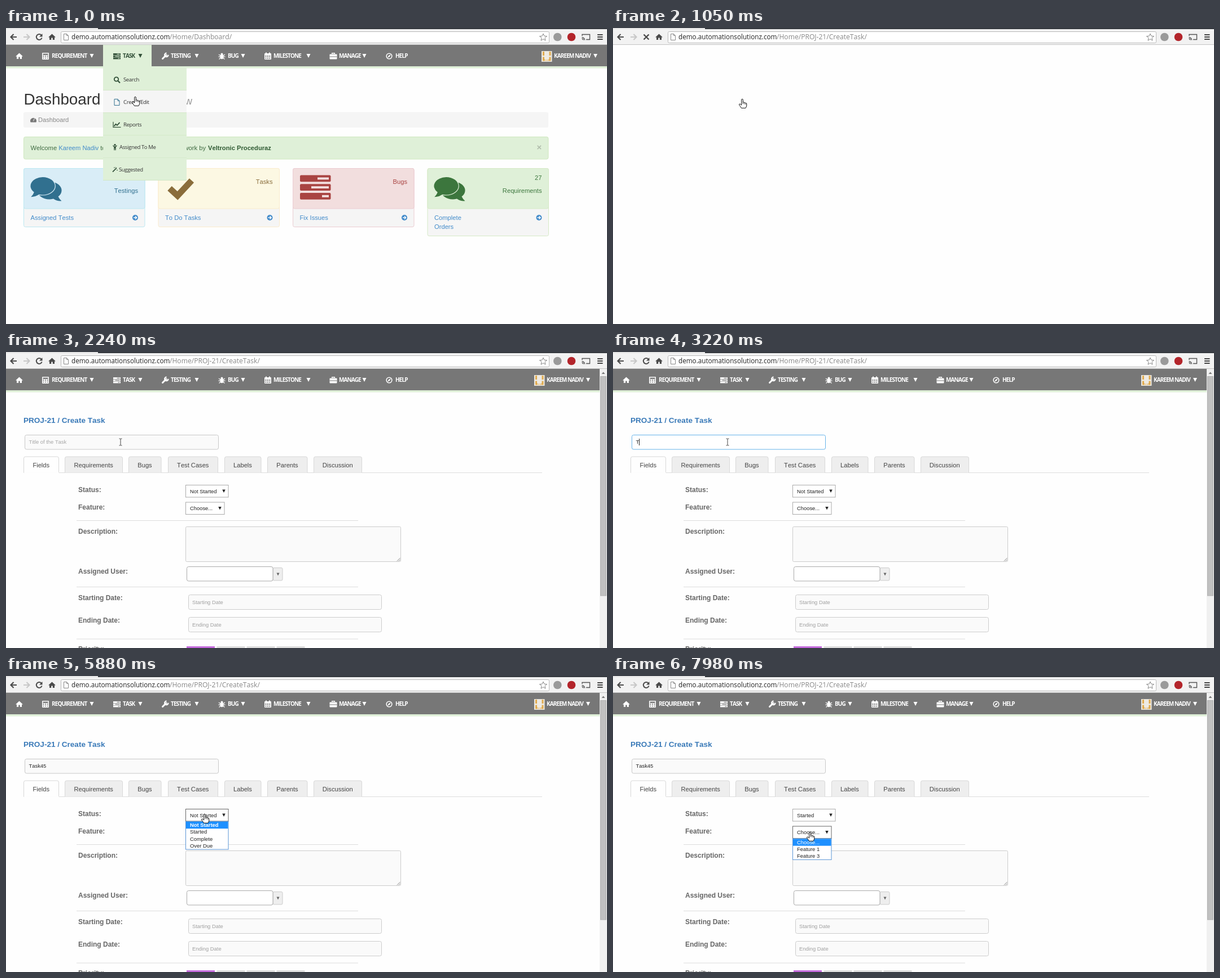
Write an HTML page that moves like this. It is 1065 by 526 pixels and loops after 8000 ms.

```html
<!DOCTYPE html>
<html lang="en">
<head>
<meta charset="utf-8">
<title>Creating a task</title>
<style>
  html, body { margin: 0; width: 100%; height: 100%; overflow: hidden; background: #fefefe; }
  svg { display: block; width: 1065px; height: 526px; font-family: "Liberation Sans", Arial, sans-serif; font-kerning: none; white-space: pre; }
  .ui { font-family: "Open Sans", "Noto Sans", sans-serif; }
  .nav { font-weight: 700; letter-spacing: -.9px; }
  .menu { letter-spacing: -.4px; }
</style>
</head>
<body>
<svg id="stage" viewBox="0 0 1065 526"></svg>
<script>
const LOOP = 8000, STEP = 70;
const USER = 'Kareem Nadiv', COMPANY = 'Veltronic Proceduraz';
const LINK = '#428bca', MINT = '#dff0d8', LEAF = '#34523a';

const text = (s, x, y, size, fill, attrs = '') =>
  `<text x="${x}" y="${y}" font-size="${size}" fill="${fill}" ${attrs}>${s}</text>`;
const rect = (x, y, w, h, fill, stroke = 'none', r = 0) =>
  `<rect x="${x}" y="${y}" width="${w}" height="${h}" fill="${fill}" stroke="${stroke}" rx="${r}"/>`;
const circle = (x, y, r, fill, attrs = '') => `<circle cx="${x}" cy="${y}" r="${r}" fill="${fill}" ${attrs}/>`;
const shape = (d, fill, attrs = '') => `<path d="${d}" fill="${fill}" ${attrs}/>`;
const line = (d, stroke, width = 1, attrs = '') =>
  `<path d="${d}" fill="none" stroke="${stroke}" stroke-width="${width}" ${attrs}/>`;
const group = (x, y, body, attrs = '') => `<g transform="translate(${x} ${y})" ${attrs}>${body}</g>`;
const down = (x, y, w, fill) => shape(`M${x - w / 2} ${y - w / 2}h${w}l${-w / 2} ${w}z`, fill);
const END = 'text-anchor="end"', MID = 'text-anchor="middle"', BOLD = 'font-weight="bold"';

// Small icons, about 12 px, centred on 0,0
const icons = {
  home: c => shape('M-6.5 .5L0-5.5 6.5.5H4.5V5H1.3V1.5H-1.3V5H-4.5V.5z', c),
  calc: (c, bg) => rect(-6, -6, 12, 12, c, 'none', 1) + rect(-4.5, -4.5, 9, 2.5, bg) +
    line('M-4.5 0h9M-4.5 3.4h9', bg, 1.8, 'stroke-dasharray="1.8 1.8"'),
  tasks: (c, bg) => [-5, -1.3, 2.4].map((y, i) =>
    rect(-6.5, y, 13, 3, c) + rect([0, -3, 2][i], y + 1, [5, 8, 3][i], 1, bg)).join(''),
  wrench: c => line('M-4.5 4.5L2-2', c, 3, 'stroke-linecap="round"') + line('M2.5-5.3A3.2 3.2 0 1 0 5.5-2.2', c, 2.2),
  bug: c => `<ellipse cy="1" rx="3" ry="4.3" fill="${c}"/>` + circle(0, -3.6, 2, c) +
    line('M-5.5-3L-2-.5M5.5-3L2-.5M-6 1.2H6M-5 5.5L-2 3M5 5.5L2 3', c, 1.2),
  calendar: (c, bg) => rect(-6, -5, 12, 11, c, 'none', 1) + line('M-4.5 0h9M-4.5 3.4h9', bg, 2, 'stroke-dasharray="2 1.4"') +
    line('M-3-6.5v3M3-6.5v3', c, 2),
  briefcase: (c, bg) => rect(-6.5, -3.5, 13, 9, c, 'none', 1) + line('M-2.3-4v-1.3h4.6V-4', c, 1.4) + line('M-6.5 1h13', bg, 1),
  compass: c => circle(0, 0, 4.8, 'none', `stroke="${c}" stroke-width="1.6"`) + shape('M3-3L1 1-3 3-1-1z', c),
  search: c => circle(-1, -1, 3.7, 'none', `stroke="${c}" stroke-width="1.8"`) + line('M2 2L5.5 5.5', c, 2.2),
  file: c => line('M-4.5-5.5H1.5L4.5-2.5V5.5H-4.5zM1.5-5.5V-2.5H4.5', c),
  chart: c => line('M-6.5-5V4.5H7', c, 1.2) + line('M-5 2.5L-2-1 .5 1 5-4', c, 1.8),
  child: c => circle(0, -4, 1.7, c) + line('M-3.5-3L-1-.5H1L3.5-3', c, 1.4) + shape('M-1.7-1h3.4v6.5H.4V2.5H-.4V5.5H-1.7z', c),
  wand: c => line('M-4 4L3-3', c, 1.8) + line('M-2-3.5h2M3 1h2M1-4.5l1 1', c),
};
const icon = (name, x, y, color, bg) => group(x, y, icons[name](color, bg));

const cursors = {
  hand: shape('M-1.3 1Q0-1 1.3 1V6Q3 5 3.8 6.6 5.4 5.8 6 7.4 7.6 7 7.8 8.8V12Q7.4 14 6 16.3H-1.5Q-3.5 13-5.3 10.8-6 8.6-3.8 9L-1.3 11z',
    '#fff', 'stroke="#111" stroke-linejoin="round"') + line('M1.3 6v3M3.8 7v2.5M6 8v2', '#111', .8),
  arrow: shape('M0 0V13.2L3 10.4 5.4 16 7.6 15 5.3 9.6H9.3z', '#fff', 'stroke="#111"'),
  ibeam: line('M-2.5-6H-.5L0-5.5.5-6H2.5M0-5.5V5.5M-2.5 6H-.5L0 5.5.5 6H2.5', '#444'),
};
const cursorPath = [
  [0, 'hand', 229, 122], [140, 'hand', 229, 126], [1820, 'hand', 229, 126],
  [1890, 'arrow', 208, 171], [1960, 'arrow', 208, 171], [2100, 'ibeam', 206, 168],
  [2240, 'ibeam', 203, 160], [4620, 'ibeam', 203, 160], [4760, 'arrow', 240, 185],
  [4970, 'arrow', 312, 238], [5110, 'hand', 352, 258], [5180, 'hand', 352, 258],
  [5390, 'hand', 352, 245], [6020, 'hand', 352, 245], [6160, 'arrow', 354, 258],
  [6440, 'arrow', 354, 270], [7140, 'arrow', 354, 271], [7210, 'hand', 352, 273],
  [7420, 'hand', 349, 276], [7910, 'hand', 349, 276], [7980, 'hand', 349, 277], [LOOP, 'hand', 349, 277],
];

function cursor(t) {
  const i = cursorPath.findLastIndex(k => k[0] <= t);
  const [t0, kind, x, y] = cursorPath[i], [t1, nextKind, nx, ny] = cursorPath[i + 1];
  const f = kind === nextKind ? (t - t0) / (t1 - t0) : 0;
  return group(x + (nx - x) * f, y + (ny - y) * f, cursors[kind]);
}

function browser(t) {
  const loading = t >= 560 && t < 1610;
  const path = t < 700 ? '/Home/Dashboard/' : '/Home/PROJ-21/CreateTask/';
  const dark = '#4a4a4a';
  return rect(0, 0, 1065, 30, '#f2f2f2') + rect(0, 0, 1065, 2, '#33373d') + rect(0, 0, 163, 2, '#e4e4e4') +
    rect(0, 29, 1065, 1, '#c4c4c4') +
    line('M19 16H9M13.5 11L8.5 16l5 5', dark, 2.2) + line('M31 16H41M36.5 11l5 5-5 5', '#c8c8c8', 2.2) +
    (loading ? line('M54.5 11.5l9 9M63.5 11.5l-9 9', dark, 2.4)
      : line('M62.5 12.5A5 5 0 1 0 63.6 17.5', dark, 2) + shape('M64.5 10v5.5H59z', dark)) +
    icon('home', 81.5, 16, dark) +
    rect(97.5, 6.5, 865, 20, '#fff', '#b9b9b9', 2) +
    line('M102.5 10.5H107.5L110.5 13.5V21.5H102.5zM107.5 10.5V13.5H110.5', '#888') +
    `<g class="ui">${text('demo.automationsolutionz.com', 116, 20, 11.7, '#222')}${text(path, 290, 20, 12.1, '#888')}</g>` +
    line('M952 10l1.8 4.2 4.7.4-3.6 3 1.1 4.6-4-2.5-4 2.5 1.1-4.6-3.6-3 4.7-.4z', '#888') +
    circle(977.3, 16, 7.3, '#9a9a9a') + circle(1002, 16, 7.3, '#b3252b') +
    line('M1021 14V11.5H1034.5V20.5H1028M1020.5 16.5a5 5 0 0 1 5 5M1020.5 19a2.5 2.5 0 0 1 2.5 2.5', '#555', 1.4) +
    line('M1048 12h9.5M1048 16h9.5M1048 20h9.5', '#444', 2.2);
}

const navItems = [
  ['calc', 70, 'REQUIREMENT', 81, 152], ['tasks', 196.5, 'TASK', 207, 238], ['wrench', 282, 'TESTING', 292, 338],
  ['bug', 382.5, 'BUG', 393, 420], ['calendar', 464, 'MILESTONE', 474, 536], ['briefcase', 580, 'MANAGE', 590, 635],
  ['compass', 679, 'HELP', 690, 0],
];

function navbar(width, taskOpen, avatar, sag) {
  const bg = '#777', userX = width - 1052, size = 10;
  const items = navItems.map(([name, ix, label, x, arrow]) => {
    const open = taskOpen && label === 'TASK', color = open ? LEAF : '#fff';
    return (open ? rect(172, 30, 86, 41, MINT) : '') + icon(name, ix, 50, color, open ? MINT : bg) +
      text(label, x, 53.2, size, color) + (arrow ? down(arrow, 49.5, 7, color) : '');
  }).join('');
  const picture = avatar
    ? rect(936, 41, 18.5, 19, '#eeeae2') + line('M939.5 42v7M939.5 51.5v5.5h2.5M951 42v7M951 51.5v5.5h-2.5M943.5 57.5h1M946.5 57.5h1', '#e0ab50', 3)
    : circle(937.5, 53, 1.5, 'none', 'stroke="#ccc"');
  return rect(0, 30, width, 38 + sag, bg) + rect(0, 68 + sag, width, 3.5, MINT) +
    `<g class="ui nav">${icon('home', 23.5, 50, '#fff')}${items}` +
    group(userX, 0, picture + text(USER.toUpperCase(), 958, 53.2, size, '#fff') + down(1031.5, 49.5, 7, '#fff')) + '</g>';
}

const bubbles = (x, y, c, bg) => group(x, y,
  shape('M33.4 8A21.6 15.7 0 0 1 49 34.600Q51 39 55 42.300 47 43 40.500 38.500 36 39.400 33.400 39.400A21.6 15.7 0 0 1 33.400 8z', c) +
  shape('M21.600 0A21.6 15.7 0 0 1 21.600 31.400Q18 31.400 15 30.800 9 35 .7 35.300 4.500 32 6.300 26.800A21.6 15.7 0 0 1 21.600 0z', c,
    `stroke="${bg}" stroke-width="2.4" paint-order="stroke"`));
const bigCheck = (x, y, c) => line(`M${x + 4} ${y + 18}l14 13L${x + 43} ${y + 4}`, c, 11);
const bigBars = (x, y, c, bg) => [31, 20, 39].map((notch, i) => {
  const top = y + 15.7 * i;
  return rect(x, top, 54.5, 11.8, c, 'none', 2) + rect(x + notch, top + 4, 51 - notch, 3.9, bg);
}).join('');

// x, background, border, ink, label lines, links, picture
const cards = [
  [31.5, '#d9edf7', '#bce8f1', '#31708f', ['', 'Testings'], ['Assigned Tests'], (c, bg) => bubbles(43.5, 265, c, bg)],
  [270, '#fcf8e3', '#faebcc', '#8a6d3b', ['Tasks'], ['To Do Tasks'], c => bigCheck(286, 267, c)],
  [508.5, '#f2dede', '#ebccd1', '#a94442', ['Bugs'], ['Fix Issues'], (c, bg) => bigBars(521, 261.5, c, bg)],
  [747, MINT, '#d6e9c6', '#3c763d', ['27', 'Requirements'], ['Complete', 'Orders'], (c, bg) => bubbles(758.5, 265, c, bg)],
];

function card([x, bg, border, ink, label, links, picture]) {
  const h = 88 + links.length * 16;
  const labelTop = label.length > 1 ? 269.5 : 277;
  return rect(x, 249.5, 214.5, h, '#f5f5f5', border, 3) + rect(x, 249.5, 214.5, 71.5, bg, border, 3) + picture(ink, bg) +
    label.map((s, i) => text(s, x + 202.5, labelTop + 23.5 * i, 11.2, ink, END)).join('') +
    links.map((s, i) => text(s, x + 12, 341 + 15.5 * i, 11.2, LINK)).join('') +
    circle(x + 197.5, 337, 5, LINK) + line(`M${x + 194.5} 337h5.5M${x + 197.5} 334.3l2.7 2.7-2.7 2.7`, '#fff', 1.3);
}

const menu = [['search', 'Search', 208, 196.5], ['file', 'Create/Edit', 208, 196.5], ['chart', 'Reports', 208, 196.5],
  ['child', 'Assigned To Me', 201, 193], ['wand', 'Suggested', 200, 193]];

function dashboard() {
  const dropdown = menu.map(([name, label, x, ix], i) => {
    const y = 71 + 39.9 * i;
    return rect(172, y, 148, 39.9, i === 1 ? '#f5f5f5' : MINT) + rect(172, Math.round(y + 39), 148, 1, '#d0e6c4') +
      icon(name, ix, y + 21, i === 1 ? '#31708f' : LEAF, MINT) + text(label, x, y + 24, 9.6, '#333');
  }).join('');
  return text('Dashboard', 31.5, 135.5, 27.8, '#333') + text('Statistics Overview', 330, 135.5, 18, '#999', END) +
    rect(31, 149.5, 930, 27.5, '#f5f5f5', 'none', 3) +
    shape('M43.5 167.5A5.5 5.5 0 1 1 53.5 167.5z', '#777') + line('M48.5 165.5L50.5 160.5', '#f5f5f5') +
    text('Dashboard', 57, 167, 11.1, '#888') +
    rect(31.5, 193.5, 929.5, 39.5, MINT, '#cfe8bf', 3) +
    text(`Welcome <tspan fill="${LINK}">${USER}</tspan> to`, 43.5, 217, 11.2, '#3f6b41') +
    text('framework by', 354, 217, 11.2, '#3f6b41', END) + text(COMPANY, 358, 217, 11.2, '#2f5a33', BOLD) +
    text('×', 945, 217, 15, '#b0bcab', BOLD + ' ' + MID) +
    cards.map(card).join('') + `<g class="ui menu">${dropdown}</g>`;
}

const tabs = [['Fields', 31, 62.5], ['Requirements', 104, 102.5], ['Bugs', 217, 58], ['Test Cases', 287, 88.5],
  ['Labels', 387, 65], ['Parents', 463, 71], ['Discussion', 545, 85.5]];
const labels = [['Status:', 249], ['Feature:', 279.5], ['Description:', 322.5], ['Assigned User:', 393.5],
  ['Starting Date:', 441], ['Ending Date:', 481], ['Priority:', 532]];
const SMALL = 9.4;
const advance = { T: .611, a: .556, s: .5, k: .5, 4: .556, 5: .556 };
const keyTimes = [3080, 3290, 3360, 3430, 4340, 4410];
const within = (t, ...spans) => spans.some(([a, b]) => t >= a && t < b);

function titleField(t) {
  const typed = 'Task45'.slice(0, keyTimes.filter(k => k <= t).length);
  const focus = within(t, [2520, 5670]);
  const caretOn = focus && !within(t, [2940, 3080], [3850, 4340], [4900, 5390]);
  const caretX = [...typed].reduce((x, c) => x + advance[c] * SMALL, 41);
  return rect(33.5, 147.5, 343, 25.5, focus ? '#fff' : '#fafafa', focus ? '#66b3ea' : '#c8c8c8', 3) +
    (typed ? text(typed, 40.5, 163, SMALL, '#222') : text('Title of the Task', 40.5, 163, SMALL, '#a5a5a5')) +
    (caretOn ? rect(Math.floor(caretX), 154, 1, 12, '#222') : '');
}

const select = (label, y, w, border) => rect(318.5, y, w, 21.5, '#fff', border) +
  text(label, 326, y + 14, SMALL, '#222') + down(310.5 + w, y + 10.7, 5.5, '#222');

function optionList(options, y, w, active, activeStyle = '') {
  return rect(318.5, y, w, options.length * 12.2 + .8, '#fff', '#5a95d5') + options.map((label, i) => {
    const on = i === active, top = y + i * 12.2;
    return (on ? rect(319, top + .5, w - 1, 12.2, '#1e90ff') : '') +
      text(label, 326, top + 9.7, SMALL, on ? '#fff' : '#222', on ? activeStyle : '');
  }).join('');
}

function form(t) {
  const tabBar = line('M31 214.5H950', '#ddd') + tabs.map(([label, x, w], i) =>
    shape(`M${x + .5} 214.5V189q0-3 3-3H${x + w - 3}q3 0 3 3V214.5`, i ? '#eee' : '#fefefe', 'stroke="#d8d8d8"') +
    (i ? '' : rect(x + 1, 213.5, w - 1, 2, '#fefefe')) +
    text(label, x + w / 2, 204.5, 11.15, '#444', MID)).join('');
  const date = (label, y) => rect(323.5, y, 342, 26, '#fafafa', '#ccc', 3) + text(label, 330, y + 16, SMALL, '#a0a0a0');
  return text('PROJ-21 / Create Task', 31, 125.5, 13.55, '#3a7ab8', BOLD) + titleField(t) + tabBar +
    labels.map(([s, y]) => text(s, 128, y, 12, '#666', BOLD)).join('') +
    line('M125 299.5H624M125 417.5H624M125 510H624', '#ddd') +
    select(t < 7070 ? 'Not Started' : 'Started', 236.5, 75.5, within(t, [5110, 7070]) ? '#666' : '#aaa') +
    select('Choose...', 267, 68.5, t >= 7770 ? '#666' : '#aaa') +
    rect(318.5, 310.5, 381, 62, '#fafafa', '#ccc', 2) + line('M693 371.5l5.5-5.5M696 371.5l2.5-2.5', '#888') +
    rect(473, 383.5, 17, 22.5, '#eee', '#ccc', 2) + rect(320.5, 381.5, 152.5, 25.5, '#fff', '#aaa', 3) + down(482, 395, 5, '#666') +
    date('Starting Date', 431.5) + date('Ending Date', 471.5) +
    [320, 373.5, 426.5, 479.5].map((x, i) => rect(x, 523, 50, 20, i ? '#ddd' : '#c46bdc')).join('') +
    (within(t, [3080, 3220]) ? rect(33.5, 173.5, 343, 38, '#fff', '#aaa') +
      text('Task43', 41, 187, SMALL, '#222') + text('Task44', 41, 204, SMALL, '#222') : '') +
    (within(t, [5670, 7070]) ? optionList(['Not Started', 'Started', 'Complete', 'Over Due'], 258.5, 75.5, t < 6300 ? 0 : 1, t < 6300 ? BOLD : '') : '') +
    (t >= 7770 ? optionList(['Choose...', 'Feature 1', 'Feature 3'], 289, 68.5, 0) : '');
}

const scrollbar = rect(1052, 30, 13, 496, '#f0f0f0') + shape('M1055.5 39h6l-3-3.5z', '#777') + rect(1053.5, 43.5, 10, 389.5, '#c0c0c0', '#b0b0b0');

function page(t) {
  if (t < 1050) return navbar(1065, true, true, 0) + dashboard();
  if (t < 1260) return '';
  const loaded = t >= 1750, sag = loaded ? 0 : 1.5;
  const opacity = Math.min(1, (t - 1260) / 560);
  return group(0, sag, form(t), `opacity="${opacity}"`) + navbar(1052, false, loaded, sag) + scrollbar;
}

const stage = document.getElementById('stage');
let shown = -1;
function draw() {
  const t = Math.floor(performance.now() % LOOP / STEP) * STEP;
  if (t !== shown) {
    stage.innerHTML = rect(0, 0, 1065, 526, '#fefefe') + page(t) + browser(t) + cursor(t);
    shown = t;
  }
  requestAnimationFrame(draw);
}
draw();
</script>
</body>
</html>
```
